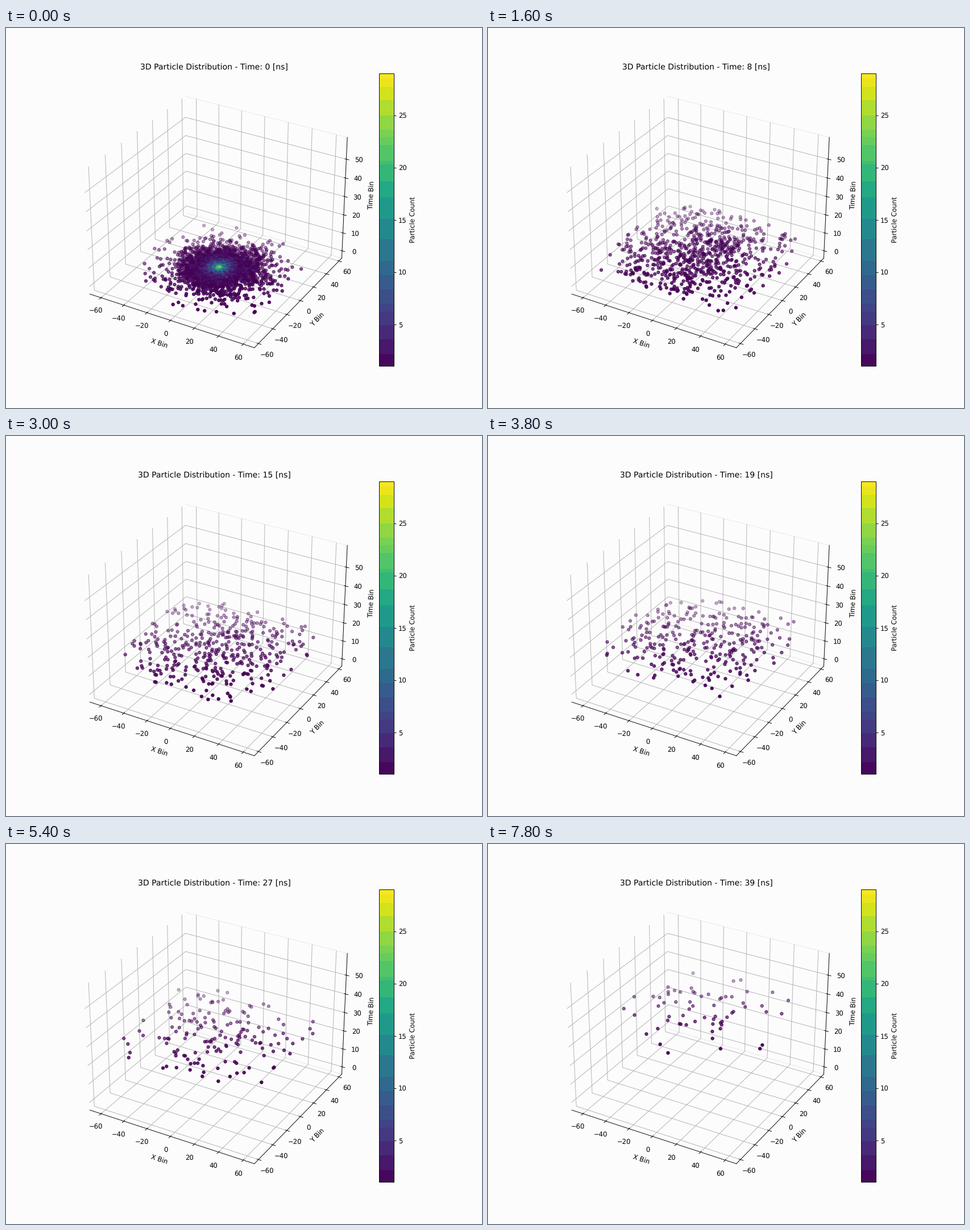
Write a matplotlib script that moves like this. It is 837 px wide and 669 px high and loops after 8000 ms.

```python
import numpy as np
import matplotlib as mpl
import matplotlib.pyplot as plt
from matplotlib.animation import FuncAnimation
from matplotlib.cm import ScalarMappable
from matplotlib.colors import ListedColormap, Normalize

mpl.rcParams["text.hinting"] = "none"

DPI = 83.7
BG = "#fcfcfc"
STEPS = 40
STEP_MS = 200
X_MAX, Y_MAX, R_MAX = 64, 60, 76
NORM = Normalize(1, 29)
VIRIDIS = mpl.colormaps["viridis"]

# Heights (px above the bar's foot) where the stepped colour bar changes tone
BANDS = np.array([0, 21, 47, 73, 97, 111, 136, 161, 186, 224, 260, 298, 326,
                  356, 362, 390, 404, 417, 442, 469, 492, 507, 516]) / 516


def stepped_viridis():
    pos = (np.arange(516) + 0.5) / 516
    band = np.digitize(pos, BANDS) - 1
    return ListedColormap(VIRIDIS((BANDS[band] + BANDS[band + 1]) / 2))


def inside(x, y):
    return ((x >= -X_MAX) & (x < X_MAX) & (y >= -Y_MAX) & (y < Y_MAX)
            & (np.hypot(x, y) < R_MAX))


def core(rng, t):
    """Prompt particles: a tight peak in a wider halo, spreading and fading."""
    n = int(5800 * np.exp(-t / 1.9))
    scale = np.where(rng.random(n) < 0.22, 3.5, 7.5) + 1.7 * t
    r = rng.gamma(2, scale)
    a = rng.uniform(0, 2 * np.pi, n)
    return r * np.cos(a), r * np.sin(a)


def diffuse(rng, t):
    """Late particles: broad cloud that thins out slowly."""
    n = int(1290 * np.exp(-t / 13) * (1 - np.exp(-t / 1.5)))
    width = 30 + 0.35 * t
    x, y = rng.normal(0, width, (2, 4 * n + 1))
    keep = np.flatnonzero(inside(x, y))[:n]
    return x[keep], y[keep]


def bins(t):
    rng = np.random.default_rng(100 + t)
    parts = core(rng, t), diffuse(rng, t)
    x, y = (np.rint(np.concatenate(p)) for p in zip(*parts))
    ok = inside(x, y)
    cells, counts = np.unique(np.stack([x[ok], y[ok]], axis=1), axis=0,
                              return_counts=True)
    return cells[:, 0], cells[:, 1], counts


fig = plt.figure(figsize=(10, 7.9929), dpi=DPI, facecolor=BG)
ax = fig.add_subplot(projection="3d")
ax.set_facecolor(BG)
ax.set_xlim(-69.95, 68.95)
ax.set_ylim(-65.6, 64.6)
ax.set_zlim(-4.15, 61.45)
ax.set_zticks(range(0, 60, 10))
ax.set_xlabel("X Bin")
ax.set_ylabel("Y Bin")
ax.set_zlabel("Time Bin")

for axis in (ax.xaxis, ax.yaxis, ax.zaxis):
    axis.set_pane_color((1, 1, 1, 0))
back = ax.yaxis.pane
back.set_alpha(1)
back.set_facecolor(BG)
back.set_edgecolor("#ececec")

bar = fig.colorbar(ScalarMappable(NORM, stepped_viridis()), ax=ax)
bar.set_label("Particle Count")

dots = []


def update(t):
    while dots:
        dots.pop().remove()
    x, y, counts = bins(t)
    dots.append(ax.scatter(x, y, np.full(len(x), t), c=counts,
                           cmap=VIRIDIS, norm=NORM))
    ax.set_title(f"3D Particle Distribution - Time: {t} [ns]")
    return dots


anim = FuncAnimation(fig, update, frames=STEPS, interval=STEP_MS,
                     repeat=True, repeat_delay=0)
plt.show()
```
